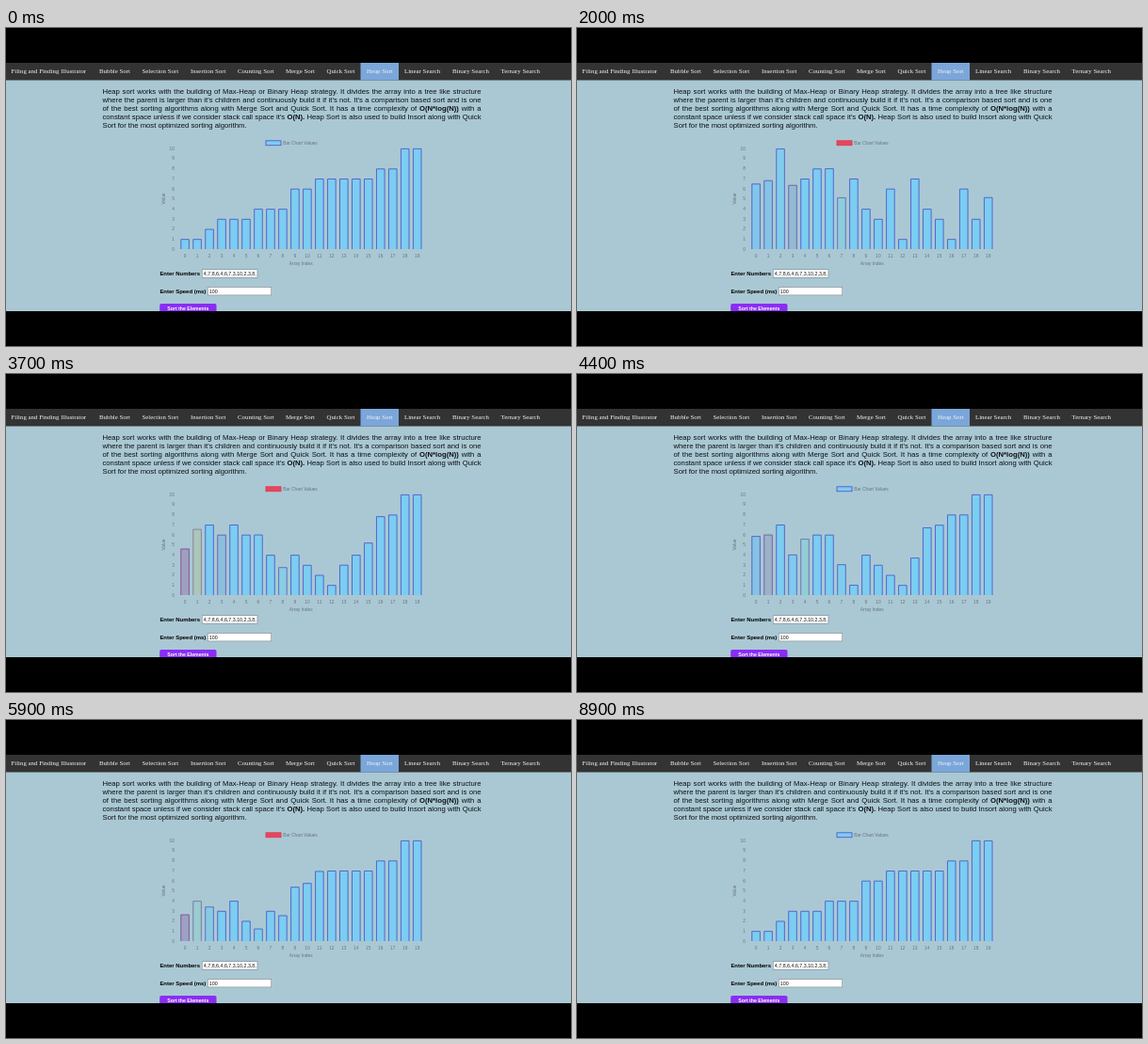
Write an HTML page with a canvas that moves like this. It is 600 px wide and 338 px high and loops after 9000 ms.

```html
<!DOCTYPE html>
<html lang="en">
<head>
<meta charset="utf-8">
<title>Heap Sort</title>
<style>
html, body { margin: 0; width: 100%; height: 100%; overflow: hidden; background: #000; }
canvas { display: block; }
</style>
</head>
<body>
<canvas id="stage" width="600" height="338"></canvas>
<script>
const ctx = document.getElementById('stage').getContext('2d');
const SANS = '"Liberation Sans", Arial, sans-serif';
const SERIF = '"Liberation Serif", "Times New Roman", serif';
const LOOP = 9000;
const EASE_TIME = 640;
const RESET_TIME = 90;

const INPUT = [4, 7, 8, 6, 4, 6, 7, 3, 10, 2, 3, 8, 1, 10, 4, 7, 1, 7, 3, 7];
const SORTED = [...INPUT].sort((a, b) => a - b);
const COUNT = INPUT.length;

const FILL = { base: [123, 205, 242], red: [232, 70, 90], yellow: [250, 205, 95] };
const EDGE = { base: [84, 92, 196], red: [214, 60, 90], yellow: [225, 185, 90] };

// Pace of the sort: [step number, time in ms]
const PACE = [[0, 222], [10, 932], [25, 1996], [51, 3642], [72, 5032], [96, 6683], [107, 7440]];

const NAV = [
  ['Filing and Finding Illustrator', 5.5], ['Bubble Sort', 99], ['Selection Sort', 144.5],
  ['Insertion Sort', 196], ['Counting Sort', 246], ['Merge Sort', 297], ['Quick Sort', 340.5],
  ['Heap Sort', 383], ['Linear Search', 423], ['Binary Search', 474], ['Ternary Search', 525.5]
];

const INTRO = [
  "Heap sort works with the building of Max-Heap or Binary Heap strategy. It divides the array into a tree like structure",
  "where the parent is larger than it's children and continuously build it if it's not. It's a comparison based sort and is one",
  "of the best sorting algorithms along with Merge Sort and Quick Sort. It has a time complexity of O(N*log(N)) with a",
  "constant space unless if we consider stack call space it's O(N). Heap Sort is also used to build Insort along with Quick",
  "Sort for the most optimized sorting algorithm."
];

function stepTime(step) {
  let k = 1;
  while (k < PACE.length - 1 && step > PACE[k][0]) k++;
  const [s0, t0] = PACE[k - 1], [s1, t1] = PACE[k];
  return t0 + (t1 - t0) * (step - s0) / (s1 - s0);
}

function recordSort() {
  const list = [...INPUT];
  const events = [{ time: RESET_TIME, values: [...list], parent: -1, child: -1 }];
  let step = 0;
  const record = (parent = -1, child = -1) =>
    events.push({ time: stepTime(step++), values: [...list], parent, child });
  const swap = (a, b) => { [list[a], list[b]] = [list[b], list[a]]; };

  function siftDown(size, i) {
    let top = i;
    for (const kid of [2 * i + 1, 2 * i + 2]) {
      if (kid < size && list[kid] > list[top]) top = kid;
    }
    if (top === i) return;
    record(i, top);
    swap(i, top);
    record();
    siftDown(size, top);
  }

  for (let i = COUNT / 2 - 1; i >= 0; i--) siftDown(COUNT, i);
  for (let end = COUNT - 1; end > 0; end--) {
    swap(0, end);
    record();
    siftDown(end, 0);
  }
  return events;
}

const EVENTS = recordSort();

// Each bar is [value, red share, yellow share]; every event restarts the easing.
function chartAt(time) {
  let start = 0;
  let from = SORTED.map(v => [v, 0, 0]);
  let to = from;
  const ease = now => {
    const left = (1 - Math.min(1, (now - start) / EASE_TIME)) ** 4;
    return to.map((bar, i) => bar.map((v, k) => v + (from[i][k] - v) * left));
  };
  for (const e of EVENTS) {
    if (e.time > time) break;
    from = ease(e.time);
    start = e.time;
    to = e.values.map((v, i) => [v, +(i === e.parent), +(i === e.child)]);
  }
  return { bars: ease(time), legend: to[0] };
}

function mix(set, [, red, yellow]) {
  const rgb = set.base.map((v, k) =>
    Math.round(v + (set.red[k] - v) * red + (set.yellow[k] - v) * yellow));
  return `rgb(${rgb})`;
}

function rect(x, y, w, h, color) {
  ctx.fillStyle = color;
  ctx.fillRect(x, y, w, h);
}

function text(str, x, y, size, color, { family = SANS, weight = '', align = 'left' } = {}) {
  ctx.font = `${weight} ${size}px ${family}`;
  ctx.fillStyle = color;
  ctx.textAlign = align;
  ctx.fillText(str, x, y);
}

function drawIntro() {
  const size = 7.69, left = 102.5, right = 504.5;
  INTRO.forEach((line, row) => {
    const words = line.split(' ').map(word => {
      const weight = word.startsWith('O(N') ? 'bold' : '';
      ctx.font = `${weight} ${size}px ${SANS}`;
      return { word, weight, width: ctx.measureText(word).width };
    });
    const used = words.reduce((sum, w) => sum + w.width, 0);
    const last = row === INTRO.length - 1;
    const gap = last ? size * 0.278 : (right - left - used) / (words.length - 1);
    let x = left;
    for (const { word, weight, width } of words) {
      text(word, x, 70.4 + row * 9, size, '#0b0f12', { weight });
      x += width + gap;
    }
  });
}

function field(label, value, x, y, w) {
  text(label, 163.4, y + 6.4, 5.95, '#000', { weight: 'bold' });
  rect(x, y, w, 9, '#7d878c');
  rect(x + 0.6, y + 0.6, w - 1.2, 7.8, '#fff');
  ctx.save();
  ctx.beginPath();
  ctx.rect(x + 1, y, w - 2, 9);
  ctx.clip();
  text(value, x + 1.8, y + 6.4, 5.3, '#111');
  ctx.restore();
}

function drawPage() {
  rect(0, 0, 600, 338, '#000');
  rect(0, 37, 600, 264, '#aac8d3');
  rect(0, 37, 600, 18.5, '#333');
  rect(376.5, 37, 40.5, 18.5, '#7ba6da');
  for (const [label, x] of NAV) text(label, x, 48, 6.85, '#f4f4f4', { family: SERIF });
  drawIntro();
  field('Enter Numbers', INPUT.join(','), 208, 256.5, 59.3);
  field('Enter Speed (ms)', '100', 214, 275.2, 68);
  ctx.fillStyle = '#8a2df5';
  ctx.beginPath();
  ctx.roundRect(163.2, 293, 60.3, 12, 1.8);
  ctx.fill();
  text('Sort the Elements', 193.3, 300.4, 5.2, '#fff', { weight: 'bold', align: 'center' });
  rect(0, 301, 600, 37, '#000');
}

function drawChart({ bars, legend }) {
  const gray = '#66747b', size = 4.85;
  const left = 183.6, pitch = 12.98, width = 9.4, base = 235, unit = 10.7;
  const center = { align: 'center' };

  ctx.lineWidth = 0.9;
  ctx.fillStyle = mix(FILL, legend);
  ctx.strokeStyle = mix(EDGE, legend);
  ctx.fillRect(276, 119.8, 16, 4.9);
  ctx.strokeRect(276, 119.8, 16, 4.9);
  text('Bar Chart Values', 294.2, 124, size, gray);

  for (let v = 0; v <= 10; v++) {
    text(v, 179, base - v * unit + 1.7, size, gray, { align: 'right' });
  }
  text('Array Index', 313.2, 252, size, gray, center);
  ctx.save();
  ctx.translate(169.4, 181.5);
  ctx.rotate(-Math.PI / 2);
  text('Value', 0, 0, size, gray, center);
  ctx.restore();

  bars.forEach((bar, i) => {
    const mid = left + (i + 0.5) * pitch;
    const x = mid - width / 2, top = base - bar[0] * unit;
    rect(x, top, width, base - top, mix(FILL, bar));
    ctx.strokeStyle = mix(EDGE, bar);
    ctx.beginPath();
    ctx.moveTo(x + 0.4, base);
    ctx.lineTo(x + 0.4, top + 0.4);
    ctx.lineTo(x + width - 0.4, top + 0.4);
    ctx.lineTo(x + width - 0.4, base);
    ctx.stroke();
    text(i, mid, 243.7, size, gray, center);
  });
}

const origin = performance.now();

function frame() {
  const time = (performance.now() - origin) % LOOP;
  drawPage();
  drawChart(chartAt(time));
  requestAnimationFrame(frame);
}
frame();
</script>
</body>
</html>
```
